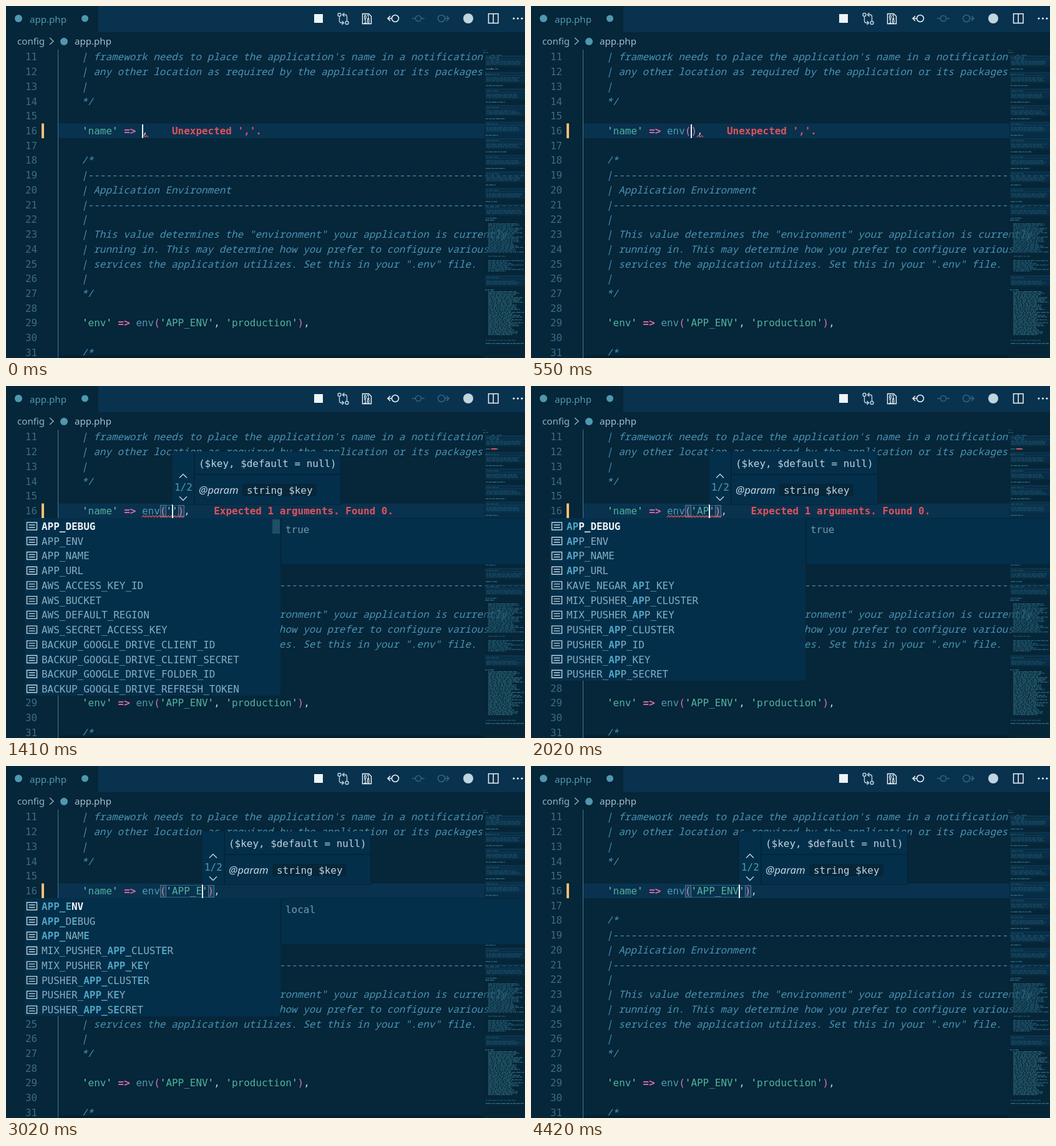
An HTML page with a canvas for the animation above (4570 ms loop, 832 by 565 pixels).

```html
<!DOCTYPE html>
<html lang="en">
<head>
<meta charset="utf-8">
<title>Editor completion</title>
<style>
  html, body { margin: 0; width: 100%; height: 100%; overflow: hidden; background: #062639; }
  canvas { display: block; }
</style>
</head>
<body>
<canvas id="stage" width="832" height="565"></canvas>
<script>
const ctx = document.getElementById('stage').getContext('2d');
const LOOP = 4570, CH = 9.6, ROW = 23.73, CODE_X = 122, ARG_X = 218;
const MONO = '15.95px "DejaVu Sans Mono", "Noto Sans Mono", monospace';
const ITALIC = 'italic 500 16px "Noto Sans Mono", "DejaVu Sans Mono", monospace';
const SANS = '15.1px "Noto Sans", "Open Sans", sans-serif';
const C = {
  bg: '#062639', bar: '#09324f', band: '#09324f', panel: '#042f4a', edge: '#05243a',
  comment: '#4a93b4', number: '#3b6c85', string: '#50b29c', quote: '#83cbbd', arrow: '#e26ca5',
  call: '#4f98b0', paren: '#d878ae', plain: '#bfd5df', red: '#e0525b', white: '#eef5f8',
  item: '#86aec2', match: '#4fa3c3', dim: '#346680'
};

const LINES = {
  11: "| framework needs to place the application's name in a notification or",
  12: '| any other location as required by the application or its packages.',
  13: '|', 14: '*/', 18: '/*',
  19: '|' + '-'.repeat(74), 20: '| Application Environment', 21: '|' + '-'.repeat(74), 22: '|',
  23: '| This value determines the "environment" your application is currently',
  24: '| running in. This may determine how you prefer to configure various',
  25: '| services the application utilizes. Set this in your ".env" file.',
  26: '|', 27: '*/', 31: '/*'
};

const KEYS = `APP_DEBUG APP_ENV APP_NAME APP_URL AWS_ACCESS_KEY_ID AWS_BUCKET AWS_DEFAULT_REGION
  AWS_SECRET_ACCESS_KEY BACKUP_GOOGLE_DRIVE_CLIENT_ID BACKUP_GOOGLE_DRIVE_CLIENT_SECRET
  BACKUP_GOOGLE_DRIVE_FOLDER_ID BACKUP_GOOGLE_DRIVE_REFRESH_TOKEN KAVE_NEGAR_API_KEY
  MIX_PUSHER_APP_CLUSTER MIX_PUSHER_APP_KEY PUSHER_APP_CLUSTER PUSHER_APP_ID PUSHER_APP_KEY
  PUSHER_APP_SECRET`.split(/\s+/);

const UNEXPECTED = "Unexpected ','.", EXPECTED = 'Expected 1 arguments. Found 0.';

// Columns (caret, hint, close) count characters from the start of the value.
const STEPS = [
  [0, { code: '', caret: 0, on: true, error: UNEXPECTED, hint: null, close: null, query: null, doc: '' }],
  [90, { code: 'e', caret: 1 }],
  [250, { code: 'en', caret: 2 }],
  [400, { code: 'env', caret: 3 }],
  [550, { code: 'env()', caret: 4 }],
  [630, { hint: 4 }],
  [700, { error: '' }],
  [780, { error: EXPECTED }],
  [1100, { code: "env('')", caret: 5 }],
  [1180, { hint: 5, close: 6 }],
  [1260, { query: '' }],
  [1330, { doc: 'true' }],
  [1790, { code: "env('A')", caret: 6, query: 'A' }],
  [1870, { hint: 6, close: 7 }],
  [2020, { code: "env('AP')", caret: 7, hint: 7, close: 8, query: 'AP' }],
  [2170, { code: "env('APP')", caret: 8, query: 'APP' }],
  [2250, { code: "env('APP_')", caret: 9, hint: 8, query: 'APP_' }],
  [2330, { hint: 9, close: 9 }],
  [2560, { close: 10 }],
  [2790, { on: false }],
  [2950, { code: "env('APP_E')", caret: 10, on: true, query: 'APP_E', doc: 'local' }],
  [3020, { hint: 10, close: 11, error: '' }],
  [3410, { code: "env('APP_ENV')", caret: 12, close: 13, query: null }],
  [3480, { hint: 12 }],
  [3870, { on: false }],
  [4420, { on: true }]
];

const stateAt = t => Object.assign({}, ...STEPS.filter(([at]) => at <= t).map(([, change]) => change));
const baseline = line => 206 + (line - 16) * ROW;

function rect(x, y, w, h, color) {
  ctx.fillStyle = color;
  ctx.fillRect(x, y, w, h);
}

function text(str, x, y, color, font = MONO) {
  ctx.font = font;
  ctx.fillStyle = color;
  ctx.fillText(str, x, y);
}

function stroke(path, color, width = 1.4) {
  ctx.strokeStyle = color;
  ctx.lineWidth = width;
  ctx.stroke(new Path2D(path));
}

function disc(x, y, r, color) {
  ctx.fillStyle = color;
  ctx.beginPath();
  ctx.arc(x, y, r, 0, 7);
  ctx.fill();
}

const ring = (x, y, r) => `M${x + r} ${y}a${r} ${r} 0 1 0 ${-2 * r} 0a${r} ${r} 0 1 0 ${2 * r} 0`;

// Colours a piece of PHP and returns the x where it ends.
function php(code, x, y) {
  for (const token of code.match(/'[^']*'|=>|\w+|[^\w']/g) || []) {
    if (token[0] === "'") {
      text("'", x, y, C.quote);
      text(token.slice(1, -1), x + CH, y, C.string);
      text("'", x + (token.length - 1) * CH, y, C.quote);
    } else if (token === '=>') {
      text(token, x, y, C.arrow, 'bold ' + MONO);
    } else {
      text(token, x, y, /\w/.test(token) ? C.call : /[()]/.test(token) ? C.paren : C.plain);
    }
    x += token.length * CH;
  }
  return x;
}

function squiggle(from, to) {
  let path = `M${from} 210.5`;
  for (let x = from, up = true; x < to; x += 2.5, up = !up) path += `l2.5 ${up ? -2.5 : 2.5}`;
  stroke(path, C.red, 1.2);
}

function drawHeader() {
  rect(0, 0, 832, 42, C.bar);
  rect(0, 0, 148, 42, C.bg);
  disc(20, 20, 6, C.call);
  text('app.php', 38, 27, C.call, SANS);
  disc(126.5, 20, 5.5, C.call);
  text('config', 18, 62, '#8fb3c4', SANS);
  stroke('M70 51l6 5.5l-6 5.5', '#8fb3c4');
  disc(93, 57, 6, C.call);
  text('app.php', 110, 62, '#a3c0ce', SANS);

  rect(494, 13, 14, 14, C.white);
  stroke(ring(534.5, 14, 2.5) + ring(546.5, 27, 2.5) +
    'M534.5 17v7q0 3 3 3h4m-3-3l3 3l-3 3M546.5 24v-7q0-3-3-3h-4m3-3l-3 3l3 3', C.plain);
  stroke('M571.5 12.5h10l4 4v12h-14z', C.white);
  text('01', 573.5, 20.5, C.white, 'bold 8px "DejaVu Sans Mono", monospace');
  text('10', 573.5, 27.5, C.white, 'bold 8px "DejaVu Sans Mono", monospace');
  stroke(ring(624, 20, 5.5) + 'M618 20h-6m4-4l-4 4l4 4', C.white, 1.5);
  stroke(ring(661, 20, 4.5) + 'M651 20h5.5M665.5 20h5.5', C.dim, 1.5);
  stroke(ring(698, 20, 5.5) + 'M704 20h6m-4-4l4 4l-4 4', C.dim, 1.5);
  disc(741, 20, 8, C.plain);
  stroke('M773.5 12.5h15.5v15h-15.5zM781.2 12v16', C.white, 1.5);
  for (const x of [814, 820.5, 827]) disc(x, 20, 1.6, C.white);
}

function drawMinimap(s) {
  let seed = 7;
  const random = () => (seed = seed * 16807 % 2147483647) / 2147483647;
  const words = (x, y, end, color) => {
    while (x < end) {
      const w = 2 + random() * 6;
      rect(x, y, Math.min(w, end - x), 1.3, color);
      x += w + 1.2;
    }
  };
  const block = (x, top, bottom, color, min) => {
    for (let y = top; y < bottom; y += 2.37) words(x, y, x + min + random() * (58 - min), color);
  };
  const section = y => {
    rect(768, y - 1, 64, 18, 'rgba(10,56,86,.4)');
    rect(768, y, 64, 0.8, '#12405a');
    words(770, y + 2.4, 790, '#1d5069');
    rect(768, y + 4.7, 64, 0.8, '#12405a');
    block(770, y + 8, y + 14, '#1d5069', 48);
  };

  rect(766, 70, 66, 495, 'rgba(6,38,57,.4)');
  words(765, 70, 770, '#1d5069');
  words(765, 74, 773, '#28617a');
  for (let y = 80; y < 330; y += 26.6) {
    section(y);
    words(769, y + 20.5, 783 + random() * 20, '#30708a');
  }
  words(768, 343, 783, '#30708a');
  block(773, 349, 396, '#28627a', 38);
  words(773, 401, 800, '#1d5069');
  block(773, 408, 426, '#28627a', 28);
  section(433);
  words(768, 455, 782, '#30708a');
  block(773, 458, 528, '#306b7c', 36);
  words(769, 536, 818, '#1d5069');
  words(769, 541, 830, '#30708a');
  if (s.error === EXPECTED) rect(778, 100, 9, 2, C.red);
  else if (!s.code) rect(777, 100, 2, 2, C.red);
}

function drawEditor(s) {
  rect(84, 188.5, 748, ROW, C.band);
  for (let n = 11; n <= 31; n++) {
    text(n, 31, baseline(n), C.number);
    if (LINES[n]) text(LINES[n], CODE_X - 1, baseline(n), C.comment, ITALIC);
  }
  rect(83, 70, 1, 495, '#44788d');
  rect(57, 188.5, 4, ROW, '#f3bf75');
  php("'env' => env('APP_ENV', 'production'),", CODE_X, baseline(29));

  if (s.close !== null) {
    const open = Math.round(ARG_X + 3 * CH) + 0.5;
    const close = Math.round(ARG_X + s.close * CH) + 0.5;
    stroke(`M${open + 9} 191.5H${close}M${open + 9} 210.5H${close}`, '#2b5d76', 1);
    for (const x of [open, close]) {
      rect(x, 191, 9, 19, 'rgba(80,140,160,.2)');
      stroke(`M${x} 191.5h9v19h-9z`, '#4a8093', 1);
    }
  }
  php("'name' =>", CODE_X, 206);
  const end = php(s.code + ',', ARG_X, 206);
  if (s.error) {
    text(s.error, end + 4 * CH, 206, C.red, 'bold ' + MONO);
    if (s.error === EXPECTED) squiggle(ARG_X, end - CH);
    else squiggle(end - CH, end);
  }
  if (s.on) rect(Math.round(ARG_X + s.caret * CH), 190, 2, 22, C.white);
  rect(84, 561, 682, 4, '#051f30');
}

function drawHint(column) {
  const x = Math.round(ARG_X + column * CH) + 1;
  rect(x, 105, 270, 86, C.edge);
  rect(x, 105, 34, 85, C.panel);
  rect(x + 36, 105, 233, 36, C.panel);
  rect(x + 36, 143, 233, 47, C.panel);
  stroke(`M${x + 11} 147.5l6-6l6 6M${x + 11} 177.5l6 6l6-6`, C.plain);
  text('1/2', x + 3, 168, C.call);
  text('($key, $default = null)', x + 42, 130, C.plain);
  text('@param', x + 42, 173, C.plain, 'italic 16.7px "Noto Sans", "Open Sans", sans-serif');
  ctx.fillStyle = C.bg;
  ctx.beginPath();
  ctx.roundRect(x + 112, 157, 119, 20, 3);
  ctx.fill();
  text('string $key', x + 119, 173, C.plain);
}

function drawList(query, doc) {
  const head = query.slice(0, 4), tail = query.slice(4);
  const pattern = new RegExp(`(^|_)(${head})(.*?)(${tail})`);
  const found = KEYS.filter(key => pattern.test(key))
    .sort((a, b) => b.startsWith(query) - a.startsWith(query));
  const shown = found.slice(0, 12);

  rect(30, 212, 410, shown.length * ROW, C.panel);
  if (doc) {
    rect(440, 212, 392, 75, C.edge);
    rect(442, 213, 390, 73, C.panel);
    text(doc, 448, 236, '#7199ab');
  }
  if (found.length > 12) rect(427, 214, 12, 23, '#1d4f66');

  shown.forEach((key, i) => {
    const y = 225 + i * ROW;
    stroke(`M33.5 ${y - 6}h16v12h-16zM36.5 ${y - 2}h10M36.5 ${y + 2}h10`, C.plain);
    const m = key.match(pattern);
    const start = m.index + m[1].length;
    const tailStart = start + head.length + m[3].length;
    [...key].forEach((letter, j) => {
      const hit = (j >= start && j < start + head.length) ||
        (j >= tailStart && j < tailStart + tail.length);
      const color = hit ? C.match : i ? C.item : C.white;
      text(letter, 57 + j * CH, y + 6, color, (hit || !i ? 'bold ' : '') + MONO);
    });
  });
}

function frame(now) {
  const s = stateAt(now % LOOP);
  rect(0, 0, 832, 565, C.bg);
  drawEditor(s);
  drawMinimap(s);
  drawHeader();
  if (s.hint !== null) drawHint(s.hint);
  if (s.query !== null) drawList(s.query, s.doc);
  requestAnimationFrame(frame);
}
requestAnimationFrame(frame);
</script>
</body>
</html>
```
